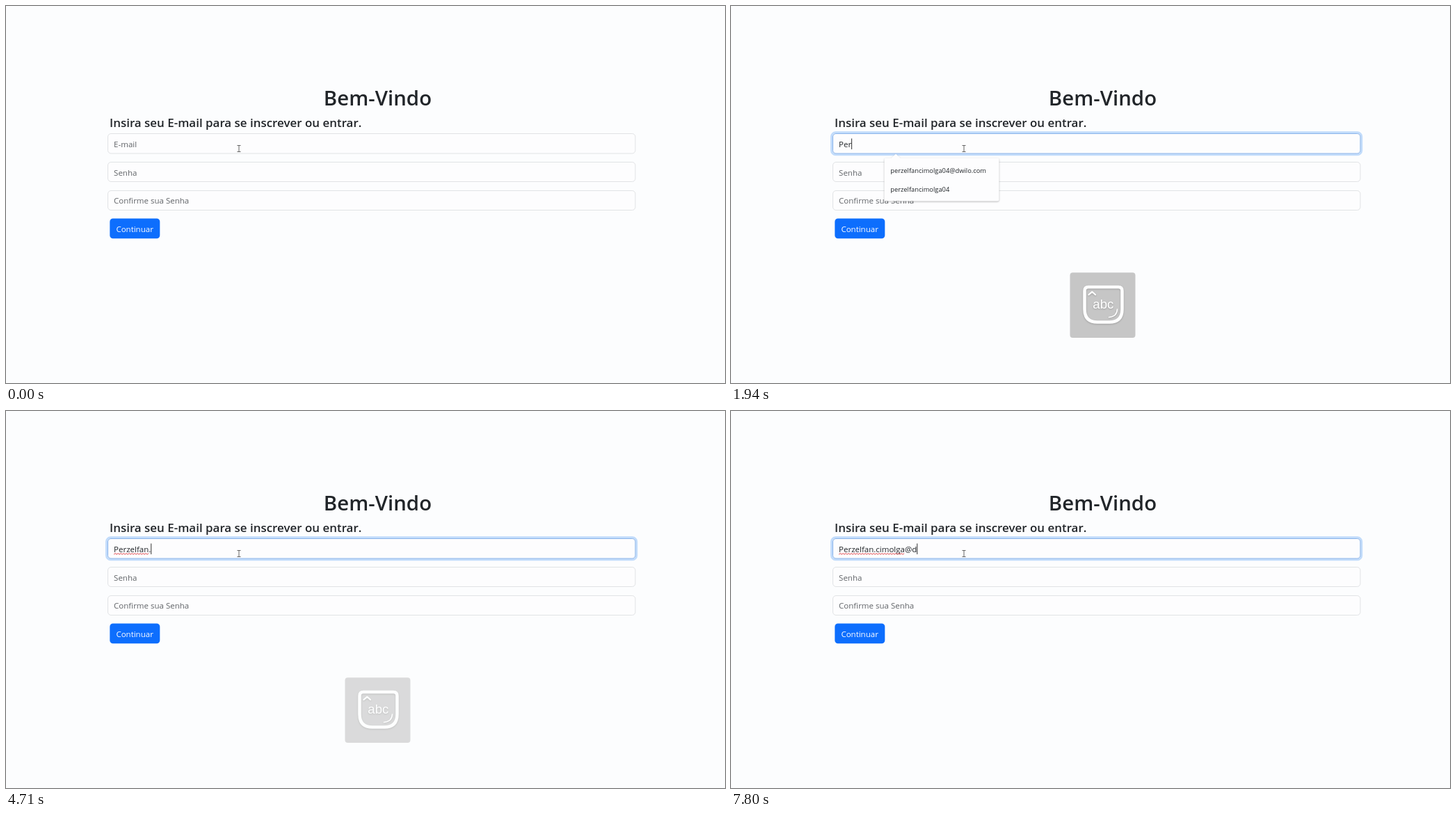
An HTML page that plays this animation: 1034 by 542 pixels, repeating every 8 s.

```html
<!DOCTYPE html>
<html lang="pt-BR">
<head>
<meta charset="utf-8">
<title>Bem-Vindo</title>
<style>
  html, body { margin: 0; width: 100%; height: 100%; overflow: hidden; background: #fcfdfe; }
  svg { display: block; width: 1034px; height: 542px; font: 11.5px "Open Sans", "Noto Sans", sans-serif; }
  text { fill: #212529; white-space: pre; }
  .heading { font-weight: 600; }
  .field { fill: #fdfdfe; stroke: #e1e3e5; }
  .hint { fill: #616468; }
  .option { font-size: 9.3px; }
  .line { fill: none; stroke: #fff; stroke-linecap: round; stroke-linejoin: round; }
  #menu { filter: drop-shadow(0.5px 1px 1px rgba(0, 0, 0, .28)); }
  #menu path { fill: #fdfdfe; }
  #keyText { font: 18.6px "Liberation Sans", Arial, sans-serif; fill: #fff; text-anchor: middle; }
  #keyMark { filter: drop-shadow(0 1px 1px rgba(0, 0, 0, .2)); }
</style>
</head>
<body>
<svg viewBox="0 0 1034 542">
  <defs>
    <radialGradient id="press">
      <stop offset="0" stop-color="#f6cfd0"/>
      <stop offset=".45" stop-color="#f3b1b3"/>
      <stop offset="1" stop-color="#ed8286"/>
    </radialGradient>
  </defs>

  <text class="heading" x="534.5" y="143.3" font-size="29.4" text-anchor="middle">Bem-Vindo</text>
  <text class="heading" x="149" y="173.8" font-size="16.95">Insira seu E-mail para se inscrever ou entrar.</text>

  <rect class="field" x="146.5" y="183.5" width="758.5" height="28.5" rx="4.5"/>
  <rect class="field" x="146.5" y="224.5" width="758.5" height="28" rx="4.5"/>
  <rect class="field" x="146.5" y="265.5" width="758.5" height="28" rx="4.5"/>
  <g id="focus">
    <rect x="144.5" y="181.7" width="762.3" height="32" rx="6" fill="none" stroke="#c2dcfb" stroke-width="3"/>
    <rect x="146.5" y="183.5" width="758.5" height="28.5" rx="4.5" fill="#fdfdfe" stroke="#8ab4ea"/>
  </g>

  <text class="hint" id="emailHint" x="155.1" y="203">E-mail</text>
  <text class="hint" x="155.1" y="243.7">Senha</text>
  <text class="hint" x="155.1" y="284.4">Confirme sua Senha</text>
  <rect x="149.3" y="305.5" width="72" height="28.8" rx="4.5" fill="#0d6efd"/>
  <text x="158.4" y="325.2" style="fill:#fff">Continuar</text>

  <text id="typed" x="155.1" y="203"></text>
  <path id="squiggle" fill="none" stroke="#e0454a"/>
  <path id="caret" stroke="#333" d="M0 190.5V206"/>

  <g id="menu">
    <path d="M223 218.5H230.5L237 212.8L243.5 218.5H383Q385.5 218.5 385.5 221V278Q385.5 280.5 383 280.5H223Q220.5 280.5 220.5 278V221Q220.5 218.5 223 218.5Z"/>
    <text class="option" x="229.3" y="239.6">perzelfancimolga04@dwilo.com</text>
    <text class="option" x="229.3" y="266.8">perzelfancimolga04</text>
  </g>

  <g id="keyIcon">
    <rect x="487.5" y="383.3" width="94" height="93.7" rx="4" fill="#c6c6c6"/>
    <g id="keyMark">
      <path class="line" stroke-width="4.5" d="M514 404H557Q562.5 404 562.5 409.5V436Q562.5 454.5 544 454.5H527Q508.5 454.5 508.5 436V409.5Q508.5 404 514 404Z"/>
      <path class="line" stroke-width="2.2" d="M514.5 415L519.3 410.8L524 415"/>
      <path class="line" stroke-width="1.6" d="M555.5 436Q555 446.5 543.5 447.5"/>
      <text id="keyText" x="535.3" y="435.3"></text>
    </g>
  </g>

  <circle id="click" cx="334" cy="205" r="8.5" fill="url(#press)" stroke="#e8797e"/>
  <path fill="none" stroke="#666" d="M332.5 200.5H337.5M332.5 209.5H337.5M335 200.5V209.5"/>
</svg>
<script>
const LOOP = 8000, BLINK = 510, TEXT_X = 155.1;
const ADDRESS = "Perzelfan.cimolga@d";
const KEY_TIMES = [1150, 1620, 1940, 2120, 2310, 2450, 2950, 3140, 3320,
  4340, 4750, 4930, 5080, 5310, 5400, 5540, 5580, 7060, 7800];
const FOCUS = 270, DOT = 4340, SPELLED = 6650;

const ui = Object.fromEntries([...document.querySelectorAll("svg [id]")].map(el => [el.id, el]));
const ramp = (t, from, to) => Math.min(1, Math.max(0, (t - from) / (to - from)));
const fade = (el, opacity) => { el.style.opacity = opacity; };
const show = (el, on) => { el.style.visibility = on ? "visible" : "hidden"; };

function wave(width) {
  let d = `M${TEXT_X} 206.2`;
  for (let x = 2, i = 0; x <= width; x += 2, i++) d += `L${TEXT_X + x} ${i % 2 ? 206.2 : 204.6}`;
  return d;
}

function widthOf(count) {
  return count ? ui.typed.getSubStringLength(0, count) : 0;
}

function draw(t) {
  const count = KEY_TIMES.filter(k => k <= t).length;
  const lastKey = count ? KEY_TIMES[count - 1] : FOCUS;
  const blink = Math.floor(Math.max(0, t - lastKey - 50) / BLINK);

  ui.typed.textContent = ADDRESS.slice(0, count);
  show(ui.emailHint, count === 0);
  ui.caret.setAttribute("transform", `translate(${TEXT_X + widthOf(count) + 0.4})`);
  show(ui.caret, t >= FOCUS && blink % 2 === 0);

  show(ui.squiggle, t >= DOT);
  if (t >= DOT) ui.squiggle.setAttribute("d", wave(widthOf(t >= SPELLED ? 17 : 9)));

  fade(ui.focus, ramp(t, 210, 380));
  show(ui.menu, t >= 370 && t < DOT);
  fade(ui.click, ramp(t, 200, 300) * (1 - ramp(t, 580, 830)));

  show(ui.keyIcon, t >= 970 && t < 5170);
  fade(ui.keyIcon, 1 - ramp(t, 4440, 5150));
  ui.keyText.textContent = t < 1380 ? "ABC" : "abc";
}

function frame() {
  draw(performance.now() % LOOP);
  requestAnimationFrame(frame);
}
frame();
</script>
</body>
</html>
```
